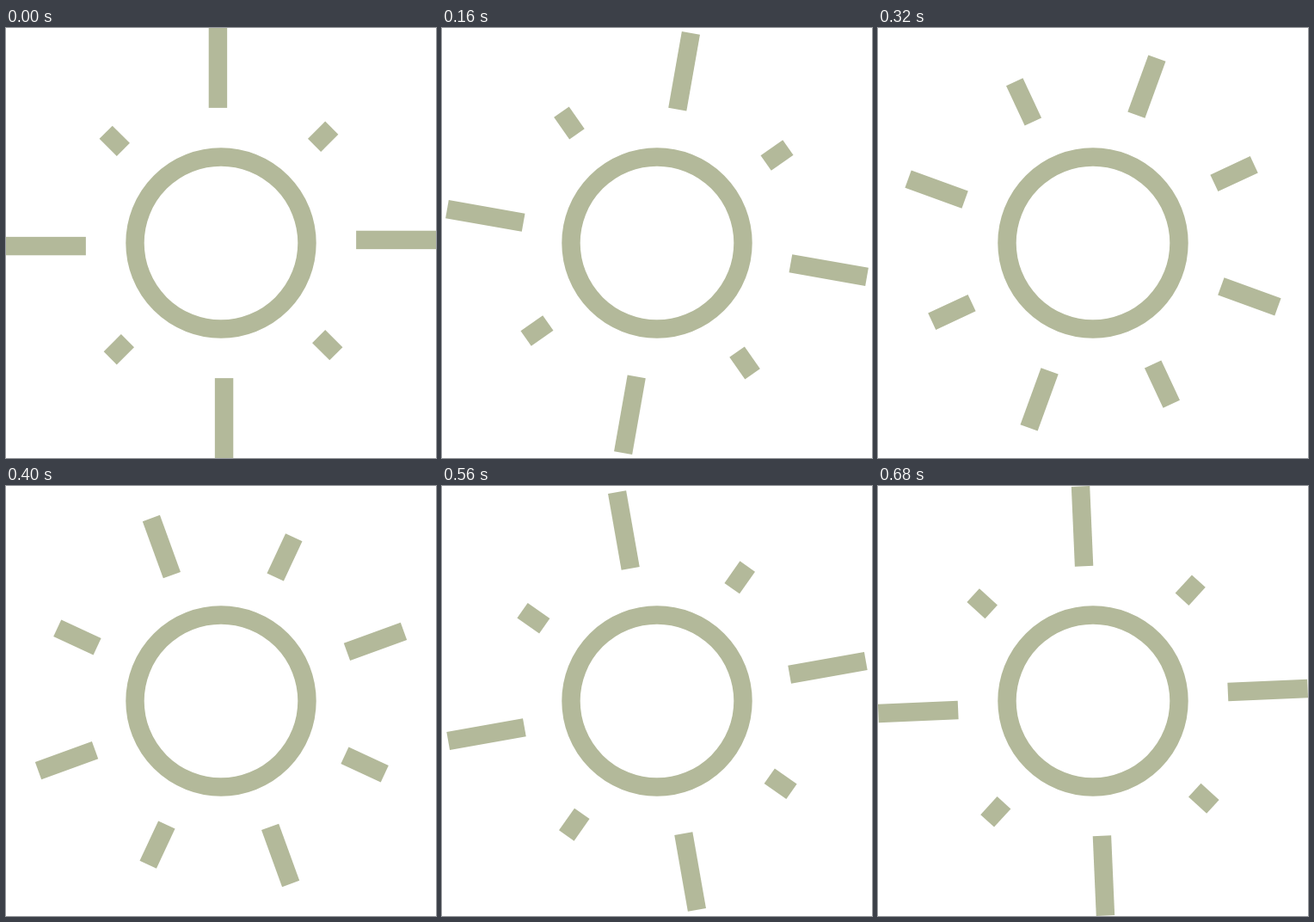
These frames come from a looping animation (500x500 px, 0.72 s). An HTML page without scripts:

```html
<!DOCTYPE html>
<html lang="en">
<head>
<meta charset="utf-8">
<title>Turning sun</title>
<style>
  @property --t {
    syntax: "<number>";
    inherits: true;
    initial-value: 0;
  }

  html, body {
    margin: 0;
    width: 100%;
    height: 100%;
    overflow: hidden;
    background: #fff;
  }

  svg {
    display: block;
    width: 100%;
    height: 100%;
  }

  .ring {
    fill: none;
    stroke: #b3b99a;
    stroke-width: 3px;
  }

  .rays {
    --early: min(var(--t), .5);
    --late: min(1 - var(--t), .5);
    /* cubic ease in and out */
    --ease: (4 * var(--early) * var(--early) * var(--early)
      + .5 - 4 * var(--late) * var(--late) * var(--late));
    fill: #b3b99a;
    transform: rotate(calc(var(--t) * 45deg));
    animation: turn 720ms steps(18) infinite;
  }

  .ray { height: calc(4px + 9px * var(--grow)); }
  .shrinking { --grow: (1 - var(--ease)); }
  .growing { --grow: var(--ease); }

  @keyframes turn {
    from { --t: 0; }
    to { --t: 1; }
  }
</style>
</head>
<body>
<svg viewBox="0 0 70 70">
  <defs>
    <!-- sits half a unit off the radius -->
    <rect id="ray" class="ray" x="-1" y="22" width="3"/>
    <g id="cross">
      <use href="#ray"/>
      <use href="#ray" transform="rotate(90)"/>
      <use href="#ray" transform="rotate(180)"/>
      <use href="#ray" transform="rotate(270)"/>
    </g>
  </defs>
  <g transform="translate(35 35)">
    <circle class="ring" r="14"/>
    <g class="rays">
      <use class="shrinking" href="#cross"/>
      <use class="growing" href="#cross" transform="rotate(45)"/>
    </g>
  </g>
</svg>
</body>
</html>
```
